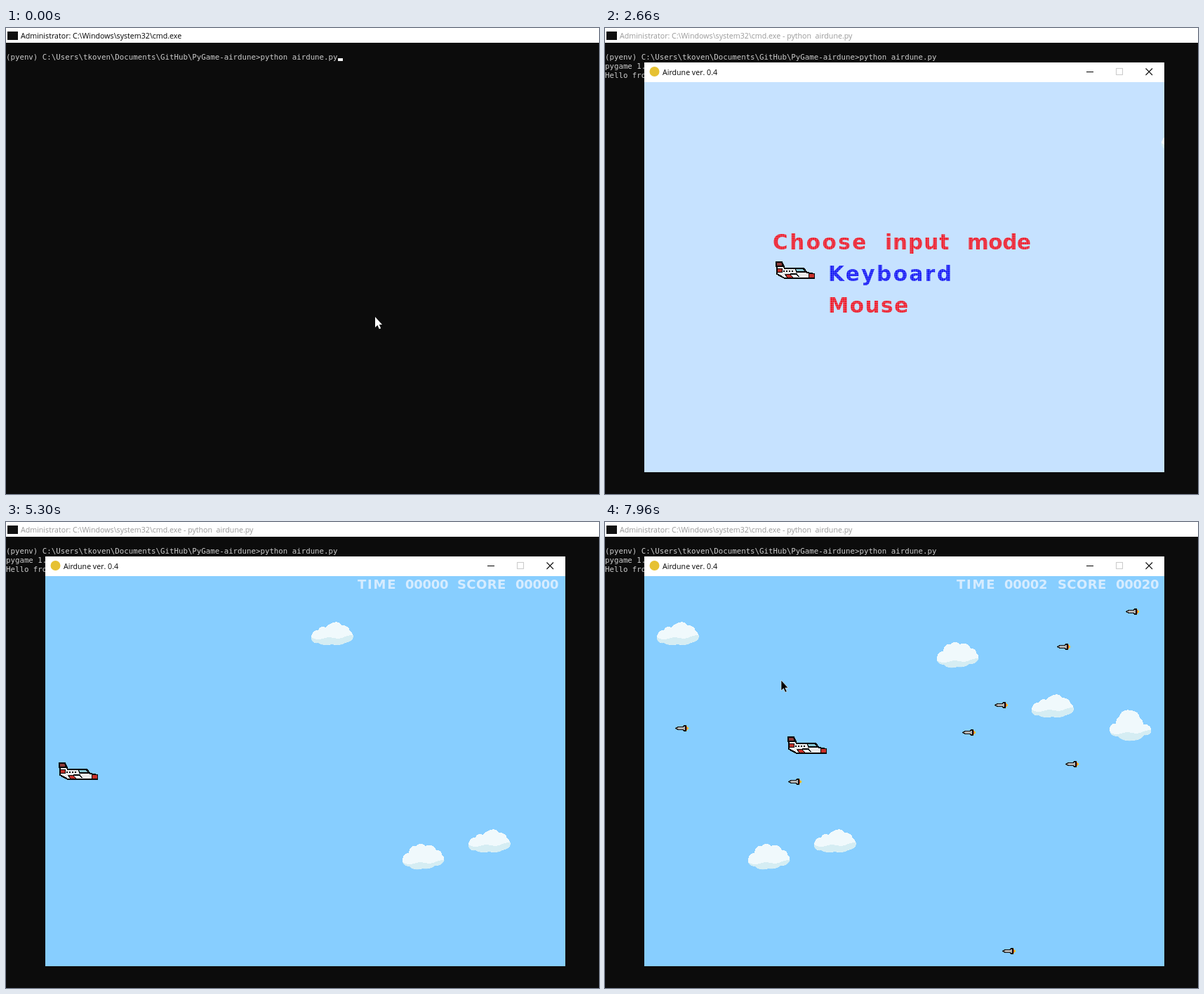
Write an HTML page that moves like this. It is 845x663 px and loops after 8000 ms.

```html
<!DOCTYPE html>
<html lang="en">
<head>
<meta charset="utf-8">
<title>Airdune</title>
<style>
html, body { margin: 0; width: 100%; height: 100%; overflow: hidden; background: #0c0c0c; }
svg { display: block; }
text { white-space: pre; }
.ui { font-family: "Open Sans", "Noto Sans", sans-serif; font-size: 10.65px; }
.term { font-family: "DejaVu Sans Mono", monospace; font-size: 10.76px; fill: #ccc; }
.menu { font-family: "DejaVu Sans", sans-serif; font-weight: bold; font-size: 29.5px; }
.hud { font-family: "DejaVu Sans", sans-serif; font-weight: bold; font-size: 18px; fill: #d6ecff; }
.px { shape-rendering: crispEdges; }
</style>
</head>
<body>
<svg width="845" height="663" viewBox="0 0 845 663">
  <defs>
    <pattern id="red" width="2.875" height="2.875" patternUnits="userSpaceOnUse">
      <rect width="2.875" height="2.875" fill="#f01828" opacity=".45"/>
      <rect width="2.4" height="2.4" fill="#f5101c"/>
    </pattern>
    <pattern id="blue" width="2.875" height="2.875" patternUnits="userSpaceOnUse">
      <rect width="2.875" height="2.875" fill="#1414f5" opacity=".45"/>
      <rect width="2.4" height="2.4" fill="#0e0ef5"/>
    </pattern>
    <clipPath id="view"><rect x="56" y="77" width="741" height="555"/></clipPath>

    <g id="plane" class="px">
      <path d="M1 1H9L13 10H40L45 16L55 18V24H13L2 18V10Z" fill="#ececec" stroke="#080808" stroke-width="2"/>
      <path d="M1 1H9L11 7H1Z" fill="#8c3a38" stroke="#080808" stroke-width="2"/>
      <path d="M2 10H9V15H2Z" fill="#c03028" stroke="#080808"/>
      <path d="M28 10H39L43 15H30Z" fill="#86c5d2" stroke="#080808" stroke-width="1.6"/>
      <path d="M47 17L55 18V23H47Z" fill="#c8302a" stroke="#080808"/>
      <path d="M13 18H20L25 23H17Z" fill="#c8302a" stroke="#080808"/>
      <path d="M21 18H30L33 22" fill="none" stroke="#080808" stroke-width="1.6"/>
      <path d="M11 13.5H26" stroke="#080808" stroke-width="2" stroke-dasharray="2 2"/>
    </g>

    <g id="missile" class="px">
      <path d="M13 1H17V8H13Z" fill="#f6c91c"/>
      <path d="M15 2H17V7H15Z" fill="#e0401c"/>
      <path d="M17 3H19V6H17Z" fill="#f6c91c"/>
      <path d="M1 4.5L4 2.5H11L13 1H15V8H13L11 6.5H4Z" fill="#b4b4b4" stroke="#101010" stroke-width="1.5"/>
    </g>

    <path id="low" d="M0 20C2 14 5 12 10 12C12 7 16 6 21 8C23 3 27 4 29 2C34 -1 41 0 43 5C49 5 54 7 55 13C59 15 61 20 59 24C57 28 51 29 48 30C42 34 35 33 29 32C22 34 14 33 10 30C3 31 -1 27 0 20Z"/>
    <path id="round" d="M0 22C1 16 4 13 9 13C9 6 14 2 19 3C22 -1 30 -1 33 3C39 0 46 3 48 9C53 8 56 12 56 15C60 18 61 24 57 27C54 31 49 31 46 31C42 35 34 36 29 35C22 37 14 37 10 32C3 32 -1 27 0 22Z"/>
    <path id="tall" d="M0 28C0 22 4 19 9 20C9 15 11 11 14 10C15 2 23 -1 30 1C38 1 43 6 43 12C47 14 48 18 48 21C55 20 59 24 59 29C60 34 55 37 49 36C46 42 38 44 31 44C23 45 15 42 12 38C5 38 0 35 0 28Z"/>
    <path id="arrow" d="M0 0V15L3.4 11.8L5.8 17.3L8.2 16.2L5.8 11H10Z"/>
  </defs>

  <rect width="845" height="663" fill="#0c0c0c"/>
  <rect width="845" height="21" fill="#fff"/>
  <rect x="2" y="5" width="15" height="12" fill="#101010"/>
  <text id="head" class="ui" x="21" y="15"></text>
  <g class="term">
    <text x="0" y="45">(pyenv) C:\Users\tkoven\Documents\GitHub\PyGame-airdune&gt;python airdune.py</text>
    <text id="out1" x="0" y="58">pygame 1.9.6</text>
    <text id="out2" x="0" y="71">Hello from the pygame community. https://www.pygame.org/contribute.html</text>
  </g>
  <rect id="caret" x="473" y="43" width="7" height="4" fill="#f2f2f2"/>

  <g id="win">
    <rect x="56" y="77" width="741" height="555"/>
    <rect x="56" y="49" width="741" height="28" fill="#fff"/>
    <rect id="icon0" x="64" y="56" width="13" height="12" fill="#74868f"/>
    <circle id="icon1" cx="70.5" cy="62" r="7" fill="#e6c132"/>
    <text id="name" class="ui" y="67"></text>
    <g fill="none" stroke="#111" stroke-width="1.1">
      <path d="M686 62.5H696"/>
      <rect x="728.5" y="57.5" width="9" height="9" stroke="#ccc"/>
      <path d="M770.5 57.5L780 67M780 57.5L770.5 67"/>
    </g>
  </g>

  <g id="game" clip-path="url(#view)">
    <rect id="sky" x="56" y="77" width="741" height="555"/>
    <g id="clouds"></g>
    <g id="missiles"></g>
    <g id="menu" class="menu">
      <g fill="url(#red)">
        <text x="239" y="314.5" letter-spacing="2.5">Choose</text>
        <text x="399" y="314.5" letter-spacing="1">input</text>
        <text x="516" y="314.5" letter-spacing="-.4">mode</text>
      </g>
      <text id="keys" x="318" y="360" letter-spacing="2.5">Keyboard</text>
      <text id="mouse" x="318" y="405" letter-spacing="1.5">Mouse</text>
    </g>
    <use id="hero" href="#plane"/>
    <g id="hud" class="hud">
      <text x="501" y="95" letter-spacing="1.8">TIME</text>
      <text id="time" x="569" y="95" letter-spacing="-.3"></text>
      <text id="label" y="95" letter-spacing=".4">SCORE</text>
      <text id="score" y="95" letter-spacing="-.3"></text>
    </g>
  </g>
  <use id="cursor" href="#arrow"/>
</svg>

<script>
const LOOP = 8000, RIGHT = 797, LEFT = 56, CLOUD_SPEED = 0.1356;
const OPEN = 960, OPEN_MS = 260, READY = 1320, PLAY = 5180;

// shape, top, time of entry at the right edge
const cloudList = [
  ['low', 142, 2628], ['round', 458, 3587], ['low', 437, 4284],
  ['round', 171, 5568], ['low', 245, 6566], ['tall', 267, 7385]
];
// top, time of entry, px per ms
const missileList = [
  [308, 5379, .36], [289, 5822, .326], [295, 6196, .163], [394, 6287, .48],
  [606, 6770, .194], [365, 6622, .4], [256, 7095, .28], [173, 7450, .3],
  [123, 7740, .25], [340, 7490, .3]
];
const heroPath = [[5300, 75, 342], [5800, 77, 342], [6000, 86, 340], [6460, 134, 328], [7960, 260, 305]];
const cursorPath = [[5900, 526, 411], [6460, 346, 313], [7960, 251, 225]];

const el = id => document.getElementById(id);
const set = (node, name, value) => node.setAttribute(name, value);
const show = (node, on) => set(node, 'visibility', on ? 'visible' : 'hidden');
const move = (node, x, y) => set(node, 'transform', `translate(${Math.round(x)} ${Math.round(y)})`);
const write = (id, s) => { if (el(id).textContent !== s) el(id).textContent = s; };
const pad = n => String(n).padStart(5, '0');

function add(parent, tag, attrs) {
  const node = document.createElementNS('http://www.w3.org/2000/svg', tag);
  for (const key in attrs) set(node, key, attrs[key]);
  return parent.appendChild(node);
}

function along(path, t) {
  let i = 0;
  while (i < path.length - 2 && t > path[i + 1][0]) i++;
  const [a, b] = [path[i], path[i + 1]];
  const u = Math.min(1, Math.max(0, (t - a[0]) / (b[0] - a[0])));
  return [a[1] + (b[1] - a[1]) * u, a[2] + (b[2] - a[2]) * u];
}

const clouds = cloudList.map(([shape, top], i) => {
  const g = add(el('clouds'), 'g', { class: 'px' });
  const clip = add(g, 'clipPath', { id: 'cloud' + i });
  add(clip, 'use', { href: '#' + shape });
  add(g, 'use', { href: '#' + shape, fill: '#f0f9fc' });
  const base = shape === 'tall' ? 32 : shape === 'round' ? 26 : 22;
  add(g, 'path', {
    d: `M0 ${base}Q8 ${base + 5} 16 ${base + 2}T32 ${base + 1}T46 ${base}T60 ${base - 3}V46H0Z`,
    fill: '#d5edf3', 'clip-path': `url(#cloud${i})`
  });
  return g;
});
const missiles = missileList.map(() => add(el('missiles'), 'use', { href: '#missile' }));

function drawConsole(t) {
  write('head', 'Administrator: C:\\Windows\\system32\\cmd.exe' + (t < 400 ? '' : ' - python  airdune.py'));
  set(el('head'), 'fill', t < OPEN ? '#000' : '#999');
  show(el('caret'), t < 400);
  show(el('out1'), t >= 480);
  show(el('out2'), t >= 560);
}

function drawWindow(t) {
  const u = Math.min(1, Math.max(0, (t - OPEN) / OPEN_MS));
  const scale = 0.915 + 0.085 * (1 - (1 - u) ** 3);
  const ready = t >= READY;
  set(el('win'), 'opacity', Math.min(1, u * 1.6));
  set(el('win'), 'transform', `translate(426.5 340.5) scale(${scale}) translate(-426.5 -340.5)`);
  set(el('icon0'), 'opacity', ready ? 0 : 1);
  set(el('icon1'), 'opacity', ready ? 1 : 0);
  write('name', ready ? 'Airdune ver. 0.4' : 'pygame window');
  set(el('name'), 'x', ready ? 82 : 83);
}

function drawGame(t) {
  const playing = t >= PLAY;
  set(el('game'), 'display', t < READY ? 'none' : 'inline');
  set(el('sky'), 'fill', playing ? '#87ceff' : '#c6e2ff');
  show(el('menu'), !playing);
  show(el('hud'), playing);

  const onMouse = (t >= 3060 && t < 3660) || t >= 4700;
  set(el('keys'), 'fill', onMouse ? 'url(#red)' : 'url(#blue)');
  set(el('mouse'), 'fill', onMouse ? 'url(#blue)' : 'url(#red)');
  move(el('hero'), ...(playing ? along(heroPath, t) : [243, onMouse ? 378 : 332]));

  clouds.forEach((g, i) => {
    const [, top, start] = cloudList[i];
    move(g, RIGHT - (t - start) * CLOUD_SPEED, top);
    show(g, t >= start);
  });
  missiles.forEach((m, i) => {
    const [top, start, speed] = missileList[i];
    const x = RIGHT - (t - start) * speed;
    move(m, x, top);
    show(m, t >= start && x >= LEFT);
  });

  const secs = Math.max(0, Math.floor((t - PLAY) / 1000));
  const shift = secs > 1 ? 2 : 0;
  write('time', pad(secs));
  write('score', pad(secs * 10));
  set(el('label'), 'x', 643 + shift);
  set(el('score'), 'x', 726 + shift);
}

function drawCursor(t) {
  const cursor = el('cursor'), late = t >= cursorPath[0][0];
  show(cursor, t < READY || late);
  set(cursor, 'fill', late ? '#000' : '#fff');
  set(cursor, 'stroke', late ? '#fff' : 'none');
  set(cursor, 'stroke-width', .6);
  move(cursor, ...along(cursorPath, t));
}

function frame() {
  const t = performance.now() % LOOP;
  drawConsole(t);
  drawWindow(t);
  drawGame(t);
  drawCursor(t);
  requestAnimationFrame(frame);
}
frame();
</script>
</body>
</html>
```
